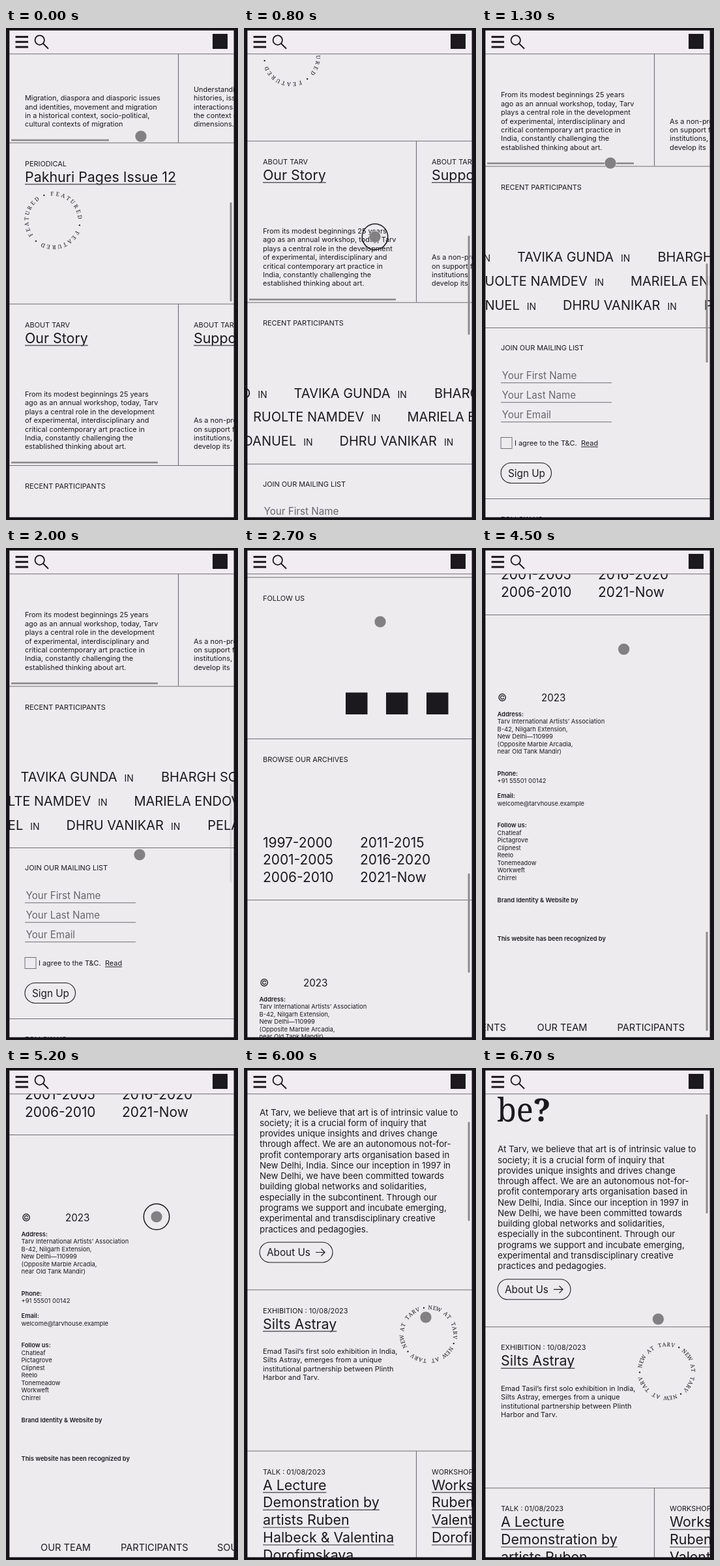
Write an HTML page that moves like this. It is 356 by 754 pixels and loops after 6800 ms.

```html
<!DOCTYPE html>
<html lang="en">
<head>
<meta charset="utf-8">
<title>Scrolling site</title>
<style>
  html, body { margin: 0; width: 100%; height: 100%; overflow: hidden; background: #17131b; }
  svg { display: block; width: 356px; height: 754px; }
  text { font-family: Inter, sans-serif; fill: #1b191d; }
  .serif { font-family: "Noto Serif", serif; }
  .bold { font-weight: 600; }
  .hint { fill: #69676b; }
  .rule { stroke: #706e72; stroke-width: 1.1; }
  .under { stroke: #5a585c; stroke-width: 1.4; }
  .thumb { fill: #8b898c; }
  .outline { fill: none; stroke: #1b191d; }
  .box { fill: none; stroke: #706e72; }
</style>
</head>
<body>
<svg id="stage" viewBox="0 0 356 754"></svg>
<script>
const LOOP = 6800, STEP = 100;
const stage = document.getElementById('stage');

function add(parent, tag, attrs, content) {
  const el = document.createElementNS('http://www.w3.org/2000/svg', tag);
  for (const k in attrs) el.setAttribute(k, attrs[k]);
  if (content) el.textContent = content;
  parent.appendChild(el);
  return el;
}
const group = (parent, x = 0, y = 0) => add(parent, 'g', { transform: `translate(${x} ${y})` });
const text = (g, x, y, str, size, cls = '') =>
  add(g, 'text', { x, y, 'font-size': size, class: cls }, str);
const line = (g, x1, y1, x2, y2, cls = 'rule') => add(g, 'line', { x1, y1, x2, y2, class: cls });
const rect = (g, x, y, width, height, attrs = {}) =>
  add(g, 'rect', { x, y, width, height, ...attrs });

function underlined(g, x, y, str, size, drop) {
  const t = text(g, x, y, str, size);
  line(g, x, y + drop, x + t.getComputedTextLength(), y + drop, 'under');
}
function lines(g, x, y, list, size, pitch) {
  list.forEach((s, i) => text(g, x, y + i * pitch, s, size));
}
const SMALL = 10.9, TITLE = 21.4;

function section(y) {
  const g = group(page, 0, y);
  line(g, 5, 0, 350, 0);
  return g;
}
function card(g, x, label, titles, desc = []) {
  text(g, x, 35.5, label, SMALL);
  titles.forEach((s, i) => underlined(g, x, 59.5 + i * 26.8, s, TITLE, 4));
  lines(g, x, 222.3 - (desc.length - 1) * 13.4, desc, SMALL, 13.4);
}
const split = g => line(g, 264.5, 0, 264.5, 247);
const slider = (g, w) => rect(g, 8, 241.6, w, 2.6, { class: 'thumb' });

// Words repeated three times around a circle
function wheel(g, x, y, phrase) {
  const spin = add(group(g, x, y), 'g', {});
  const chars = [...('• ' + phrase + ' ').repeat(3)];
  const width = c => (c === ' ' ? 0.45 : 1);
  const unit = 360 / chars.reduce((sum, c) => sum + width(c), 0);
  let at = -0.5;
  for (const c of chars) {
    const angle = (at + width(c) / 2) * unit;
    at += width(c);
    if (c === ' ') continue;
    const t = text(spin, 0, -38.2, c, 8.4, 'serif');
    t.setAttribute('text-anchor', 'middle');
    t.setAttribute('transform', `rotate(${angle})`);
  }
  return spin;
}

function button(g, x, y, w, label) {
  rect(g, x, y, w, 31, { rx: 15.5, class: 'outline', 'stroke-width': 1.1 });
  text(g, x + 11, y + 21.3, label, 15.3);
}

rect(stage, 5, 3, 345, 748, { fill: '#edebee' });
const page = add(stage, 'g', {});

// Introduction
const heading = text(page, 23, -314.5, 'be', 48.5, 'serif');
add(heading, 'tspan', { 'font-weight': 600 }, '?');
lines(page, 24, -267.5, [
  'At Tarv, we believe that art is of intrinsic value to',
  'society; it is a crucial form of inquiry that',
  'provides unique insights and drives change',
  'through affect. We are an autonomous not-for-',
  'profit contemporary arts organisation based in',
  'New Delhi, India. Since our inception in 1997 in',
  'New Delhi, we have been committed towards',
  'building global networks and solidarities,',
  'especially in the subcontinent. Through our',
  'programs we support and incubate emerging,',
  'experimental and transdisciplinary creative',
  'practices and pedagogies.'
], 13.3, 16.27);
button(page, 24, -73, 112, 'About Us');
add(page, 'path', { d: 'M110 -57.5h14M118.5 -63l5.5 5.5l-5.5 5.5', class: 'outline', 'stroke-width': 1.2 });

// Exhibition
const show = section(0);
card(show, 29, 'EXHIBITION : 10/08/2023', ['Silts Astray']);
lines(show, 29, 98, [
  'Emad Tasil’s first solo exhibition in India,',
  'Silts Astray, emerges from a unique',
  'institutional partnership between Plinth',
  'Harbor and Tarv.'
], SMALL, 13.4);
const newWheel = wheel(show, 283, 68, 'NEW  AT  TARV');

// Talks
const talk = section(247);
split(talk);
card(talk, 29, 'TALK : 01/08/2023',
  ['A Lecture', 'Demonstration by', 'artists Ruben', 'Halbeck & Valentina', 'Dorofimskaya']);
card(talk, 288, 'WORKSHOP', ['Workshop', 'Ruben H', 'Valentina', 'Dorofim']);

// Research
const study = section(494);
split(study);
card(study, 29, 'RESEARCH', ['Migration'], [
  'Migration, diaspora and diasporic issues',
  'and identities, movement and migration',
  'in a historical context, socio-political,',
  'cultural contexts of migration'
]);
card(study, 288, 'RESEARCH', ['Histories'], [
  'Understanding', 'histories, issues', 'interactions and', 'the context of', 'dimensions.'
]);
slider(study, 150);

// Periodical
const issue = section(741);
card(issue, 29, 'PERIODICAL', ['Pakhuri Pages Issue 12']);
const featWheel = wheel(issue, 72.5, 119, 'FEATURED');

// About
const about = section(988);
split(about);
card(about, 29, 'ABOUT TARV', ['Our Story'], [
  'From its modest beginnings 25 years',
  'ago as an annual workshop, today, Tarv',
  'plays a central role in the development',
  'of experimental, interdisciplinary and',
  'critical contemporary art practice in',
  'India, constantly challenging the',
  'established thinking about art.'
]);
card(about, 288, 'ABOUT TARV', ['Support Us'],
  ['As a non-profit', 'on support from', 'institutions, to', 'develop its']);
slider(about, 225);

// Participants ticker
const people = section(1235.5);
text(people, 29, 35.5, 'RECENT PARTICIPANTS', SMALL);
const ticker = add(people, 'g', {});
function names(x, y, list, anchor) {
  const t = add(ticker, 'text', { x, y, 'text-anchor': anchor });
  list.forEach((name, i) => {
    add(t, 'tspan', { dx: i ? 42 : 0, 'font-size': 20 }, name);
    add(t, 'tspan', { dx: 11, 'font-size': 14 }, 'IN');
  });
}
[
  [54, ['OLA FERAMO'], ['TAVIKA GUNDA', 'BHARGH SOLWE', 'IRU MELANI']],
  [228, ['DEV SORANI', 'RUOLTE NAMDEV'], ['MARIELA ENDOVA', 'KESU TARIN']],
  [124, ['ORA DANUEL'], ['DHRU VANIKAR', 'PELA OSWINI', 'NAVU REGE']]
].forEach(([x, before, after], i) => {
  const y = 146 + i * 36.8;
  names(x - 41, y, before, 'end');
  names(x, y, after, 'start');
});

// Mailing list
const mail = section(1483);
text(mail, 29, 34.5, 'JOIN OUR MAILING LIST', SMALL);
['Your First Name', 'Your Last Name', 'Your Email'].forEach((s, i) => {
  text(mail, 30.5, 78.3 + i * 30, s, 15.2, 'hint');
  line(mail, 29, 84.3 + i * 30, 199, 84.3 + i * 30);
});
rect(mail, 29, 168, 17, 17, { class: 'box' });
text(mail, 50, 180, 'I agree to the T&C.', SMALL);
underlined(mail, 152, 180, 'Read', SMALL, 2.4);
button(mail, 29, 207, 77.5, 'Sign Up');

// Social links
const social = section(1745);
text(social, 29, 35.5, 'FOLLOW US', SMALL);
[156, 218, 280].forEach(x => rect(social, x, 176.5, 33.5, 33.5, { fill: '#1b191d' }));

// Archives
const archive = section(1992.5);
text(archive, 29, 35.5, 'BROWSE OUR ARCHIVES', SMALL);
lines(archive, 29, 166, ['1997-2000', '2001-2005', '2006-2010'], 20.9, 26.8);
lines(archive, 178, 166, ['2011-2015', '2016-2020', '2021-Now'], 20.9, 26.8);

// Footer
const foot = section(2239.5);
text(foot, 24, 132, '©', 15.5);
text(foot, 91, 132, '2023', 15.2);
function block(y, head, list = []) {
  text(foot, 23.5, y, head, 9.3, 'bold');
  lines(foot, 23.5, y + 11.5, list, 9.4, 11.5);
}
block(155.3, 'Address:', [
  'Tarv International Artists’ Association',
  'B-42, Nilgarh Extension,',
  'New Delhi—110999',
  '(Opposite Marble Arcadia,',
  'near Old Tank Mandir)'
]);
block(246, 'Phone:', ['+91 55501 00142']);
block(280.5, 'Email:', ['welcome@tarvhouse.example']);
block(325.5, 'Follow us:',
  ['Chatleaf', 'Pictagrove', 'Clipnest', 'Reelo', 'Tonemeadow', 'Workweft', 'Chirrel']);
block(440, 'Brand Identity & Website by');
block(499, 'This website has been recognized by');
const menu = add(foot, 'g', {});
[[-52, 'EVENTS'], [53, 'OUR TEAM'], [176, 'PARTICIPANTS'], [324, 'SOUTH ASIA'], [455, 'ARCHIVE']]
  .forEach(([x, s]) => text(menu, x, 637, s, 14.6));

// Fixed header
rect(stage, 5, 3, 345, 36.5, { fill: '#f0ecf2' });
line(stage, 5, 39.7, 350, 39.7);
[12.1, 19.8, 27.6].forEach(y => rect(stage, 14.5, y, 19.5, 3, { fill: '#1b191d' }));
add(stage, 'circle', { cx: 51.7, cy: 18.6, r: 7.2, class: 'outline', 'stroke-width': 1.8 });
add(stage, 'path', { d: 'M56.8 23.7L65 31.8', class: 'outline', 'stroke-width': 1.9 });
rect(stage, 317, 9, 23, 23, { fill: '#1b191d' });

const thumb = rect(stage, 343.6, 0, 2.9, 152, { rx: 1.4, class: 'thumb' });
add(stage, 'path', { d: 'M0 0H356V754H0ZM5.3 3.8V749.8H349.6V3.8Z', 'fill-rule': 'evenodd', fill: '#17131b' });

const pointer = add(stage, 'g', {});
const ring = add(pointer, 'circle', { r: 19.7, class: 'outline', 'stroke-width': 1.5 });
add(pointer, 'circle', { r: 9, fill: '#828083', stroke: '#f7f5f8', 'stroke-width': 0.6 });

// Scroll gestures: start, end, from, to
const swipes = [
  [650, 1300, 565, 1023.5],
  [2100, 2700, 1023.5, 1700],
  [3550, 4290, 1700, 2137]
];
const FLING = 5200, TOP = -399, DECAY = 212.7;

function scrollAt(t) {
  if (t >= FLING) return TOP + (2137 - TOP) * Math.exp((FLING - t) / DECAY);
  let y = swipes[0][2];
  for (const [a, b, from, to] of swipes) {
    if (t <= a) break;
    const left = 1 - Math.min(1, (t - a) / (b - a));
    y = to - (to - from) * left ** 3;
  }
  return y;
}

function thumbAlpha(t) {
  if (t > FLING) return 1;
  let end = 0;
  for (const [a, b] of swipes) if (t >= a) end = b;
  return Math.max(0, Math.min(1, (end + 750 - t) / 250));
}

const path = [
  [0, 207, 166], [550, 204, 430], [650, 204, 430], [950, 198, 210], [1300, 197, 207],
  [1450, 197, 207], [2000, 205, 470], [2100, 205, 470], [2400, 208, 116], [2700, 209, 113],
  [2850, 209, 113], [3400, 213, 500], [3550, 213, 500], [3900, 214, 143], [4300, 215, 140],
  [5050, 230, 226], [5200, 231, 228], [5500, 278, 380], [6000, 279, 382], [6800, 270, 385]
];
function pointerAt(t) {
  const i = path.findIndex(p => p[0] > t);
  const [a, x0, y0] = path[i - 1], [b, x1, y1] = path[i];
  const u = (t - a) / (b - a), e = u * u * (3 - 2 * u);
  return [x0 + (x1 - x0) * e, y0 + (y1 - y0) * e];
}
const presses = [[650, 850], [2100, 2300], [3550, 4000], [5150, 5450]];

function draw(t) {
  const y = scrollAt(t);
  page.setAttribute('transform', `translate(0 ${-y})`);
  thumb.setAttribute('y', 82.5 + (y + 340) * 0.2041);
  thumb.setAttribute('opacity', thumbAlpha(t));
  featWheel.setAttribute('transform', `rotate(${-20 + t * 0.054})`);
  newWheel.setAttribute('transform', `rotate(${-10 + (t - 6000) * 0.054})`);
  ticker.setAttribute('transform', `translate(${(1300 - t) * 0.045} 0)`);
  menu.setAttribute('transform', `translate(${(5200 - t) * 0.045} 0)`);
  pointer.setAttribute('transform', `translate(${pointerAt(t)})`);
  ring.setAttribute('opacity', presses.some(([a, b]) => t >= a && t < b) ? 1 : 0);
}

const start = performance.now();
function tick() {
  const t = (performance.now() - start + 10) % LOOP;
  draw(Math.floor(t / STEP) * STEP);
  requestAnimationFrame(tick);
}
tick();
</script>
</body>
</html>
```
